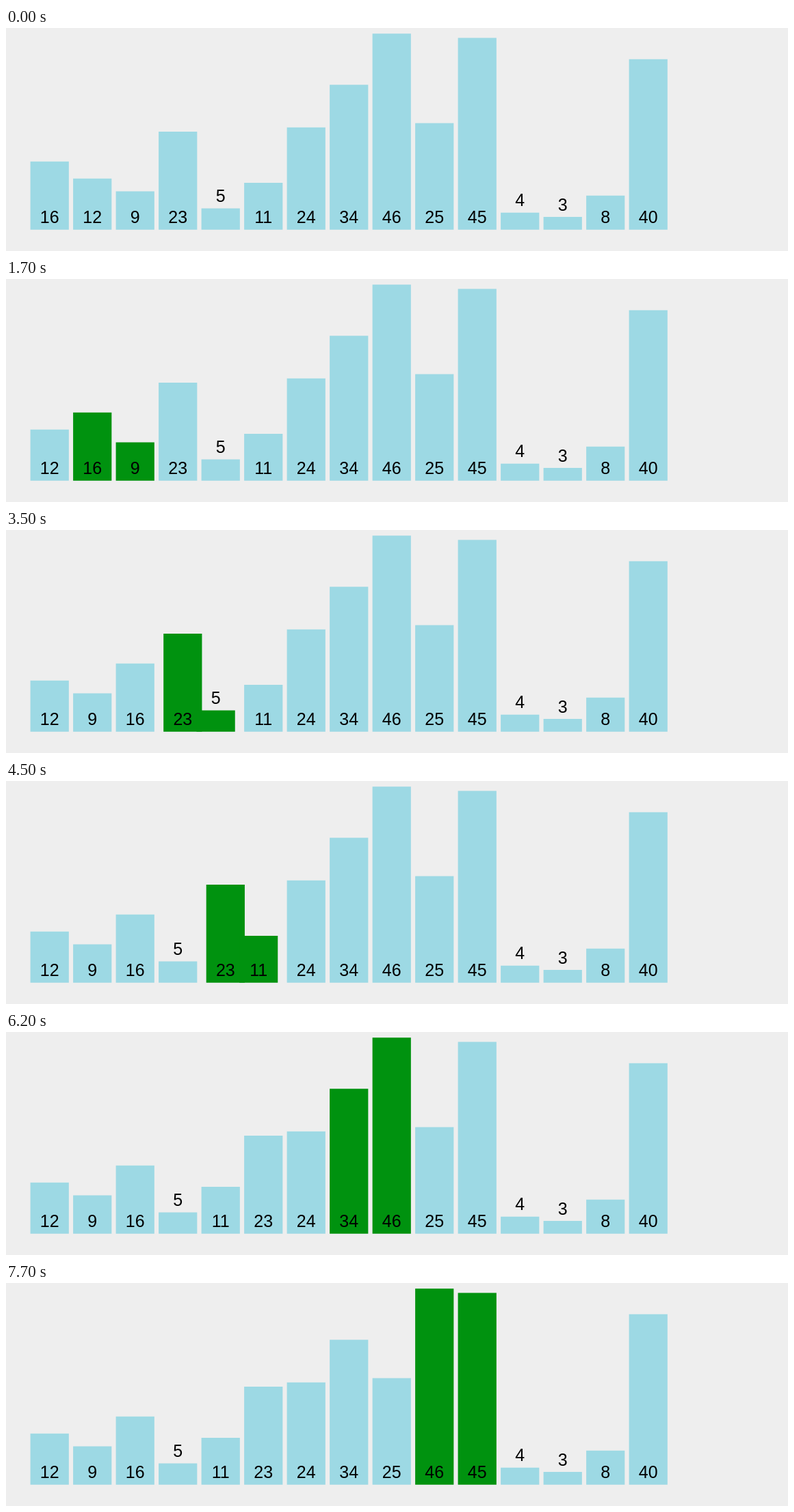
An HTML page with a canvas for the animation above (8 s loop, 1143x327 px).

```html
<!DOCTYPE html>
<html lang="en">
<head>
<meta charset="utf-8">
<title>Bubble sort</title>
<style>
  html, body { margin: 0; width: 100%; height: 100%; overflow: hidden; background: #eee; }
  canvas { display: block; }
</style>
</head>
<body>
<canvas id="stage" width="1143" height="327"></canvas>
<script>
const ctx = document.getElementById('stage').getContext('2d');
const VALUES = [16, 12, 9, 23, 5, 11, 24, 34, 46, 25, 45, 4, 3, 8, 40];
const LEFT = 35.6, BASE = 295.75, PITCH = 62.5, WIDTH = 56.25, UNIT = 6.25;
const LABEL_GAP = 9.5, SMALL = 6;
const IDLE = [157, 217, 228], ACTIVE = [0, 146, 15];
const LOOP = 8000, BEAT = 500, LEAD = 122, TICK = 100;
const SLOW_STEPS = [1, 6, 8];

// Each state holds the slot of every bar and the two bars being compared.
function sortStates(stepCount) {
  const order = VALUES.map((_, bar) => bar);
  const states = [];
  const save = active => {
    const slots = [];
    order.forEach((bar, slot) => slots[bar] = slot);
    states.push({ slots, active });
  };
  save([]);
  for (let i = 0; states.length <= stepCount; i++) {
    const pair = [order[i], order[i + 1]];
    save(pair);
    if (VALUES[pair[0]] > VALUES[pair[1]]) {
      [order[i], order[i + 1]] = [pair[1], pair[0]];
      save(pair);
    }
  }
  return states;
}

const states = sortStates(LOOP / BEAT - 1);
const mix = (a, b, p) => a + (b - a) * p;
const easeInOut = u => u < 0.5 ? 4 * u ** 3 : 1 - 4 * (1 - u) ** 3;

function poseAt(time) {
  const step = Math.floor((time + LEAD) / BEAT) - 1;
  if (step < 0) return { from: states[0], to: states[0], p: 1 };
  const last = Math.min(step, states.length - 2);
  const duration = SLOW_STEPS.includes(last) ? 400 : 340;
  const elapsed = time + LEAD - (last + 1) * BEAT;
  const p = easeInOut(Math.min(1, elapsed / duration));
  return { from: states[last], to: states[last + 1], p };
}

function draw(time) {
  const { from, to, p } = poseAt(time);
  const xOf = bar => LEFT + PITCH * mix(from.slots[bar], to.slots[bar], p);

  ctx.fillStyle = '#eee';
  ctx.fillRect(0, 0, 1143, 327);

  VALUES.forEach((value, bar) => {
    const glow = mix(+from.active.includes(bar), +to.active.includes(bar), p);
    const rgb = IDLE.map((c, i) => Math.round(mix(c, ACTIVE[i], glow)));
    ctx.fillStyle = `rgb(${rgb})`;
    ctx.fillRect(xOf(bar), BASE - value * UNIT, WIDTH, value * UNIT);
  });

  ctx.fillStyle = '#000';
  ctx.font = '25px "Liberation Sans", Arial, sans-serif';
  ctx.textAlign = 'center';
  VALUES.forEach((value, bar) => {
    const foot = value < SMALL ? BASE - value * UNIT : BASE;
    ctx.fillText(value, xOf(bar) + WIDTH / 2, foot - LABEL_GAP);
  });
}

const start = performance.now();
function frame() {
  const time = (performance.now() - start) % LOOP;
  draw(Math.floor(time / TICK) * TICK);
  requestAnimationFrame(frame);
}
frame();
</script>
</body>
</html>
```
